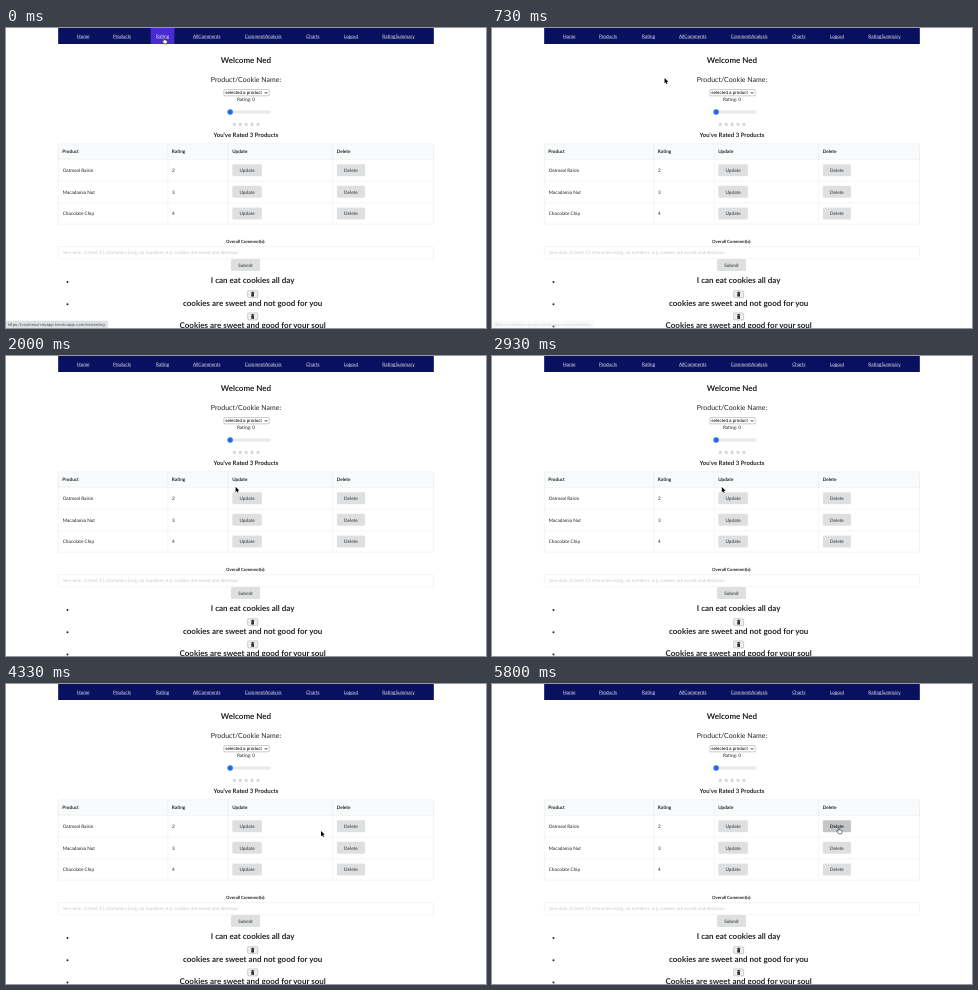
Recreate the animation shown at these times as an HTML page with a canvas. Size 480 px wide and 300 px high, loop 8000 ms.

```html
<!DOCTYPE html>
<html lang="en">
<head>
<meta charset="utf-8">
<title>Cookie ratings</title>
<style>
  html, body { margin: 0; width: 100%; height: 100%; overflow: hidden; background: #fff; }
  canvas { display: block; width: 480px; height: 300px; }
</style>
</head>
<body>
<canvas id="stage"></canvas>
<script>
const LOOP = 8000, TICK = 1000 / 15;
const LATO = 'Lato, sans-serif';
const INK = 'rgba(0,0,0,.87)', LINE = 'rgba(34,36,38,.12)';
const LEFT = 156.5, WIDTH = 1127;

const canvas = document.getElementById('stage');
const ctx = canvas.getContext('2d');
const dpr = window.devicePixelRatio || 1;
canvas.width = 480 * dpr;
canvas.height = 300 * dpr;

// The page is laid out at 1440 x 900 and shown at one third.
const K = 3;

const nav = [
  ['Home', 213], ['Products', 321], ['Rating', 450], ['AllComments', 561],
  ['CommentAnalysis', 716.5], ['Charts', 900.5], ['Logout', 1014], ['RatingSummary', 1129]
];
const columns = [['Product', LEFT], ['Rating', 485], ['Update', 666], ['Delete', 979.5]];
const ratings = [['Oatmeal Raisin', 2], ['Macadamia Nut', 3], ['Chocolate Chip', 4]];
const comments = [
  'I can eat cookies all day',
  'cookies are sweet and not good for you',
  'Cookies are sweet and good for your soul'
];

// Pointer moves: start ms, end ms, then the stage point reached.
const START = [158, 10];
const moves = [
  [0, 733, 172.5, 50], [733, 867, 192, 77], [867, 933, 192.7, 80],
  [1133, 1400, 227, 124.2], [1667, 2000, 229.6, 130.8], [2867, 2933, 229.8, 131],
  [2933, 3200, 246, 142], [3333, 3600, 279, 142.3], [3800, 4000, 311, 147],
  [4133, 4333, 315, 147], [4333, 4467, 324, 147], [4733, 5000, 344, 147],
  [5200, 5467, 347, 145], [5667, 5800, 346.8, 144]
];

const clamp = v => Math.max(0, Math.min(1, v));

function pointerAt(t) {
  let [x, y] = START;
  for (const [from, to, tx, ty] of moves) {
    const p = clamp((t - from) / (to - from));
    x += (tx - x) * p;
    y += (ty - y) * p;
  }
  return { x: x * K, y: y * K };
}

const inside = (p, x, y, w, h) => p.x >= x && p.x <= x + w && p.y >= y && p.y <= y + h;

function text(str, x, y, size, { bold, align = 'left', color = INK, font = LATO } = {}) {
  ctx.font = `${bold ? 700 : 400} ${size}px ${font}`;
  ctx.textAlign = align;
  ctx.fillStyle = color;
  ctx.fillText(str, x, y);
}

function box(x, y, w, h, fill, r = 0, stroke) {
  ctx.beginPath();
  ctx.roundRect(x, y, w, h, r);
  if (fill) { ctx.fillStyle = fill; ctx.fill(); }
  if (stroke) { ctx.strokeStyle = stroke; ctx.lineWidth = 1; ctx.stroke(); }
}

function line(x1, y1, x2, y2, color, width = 1) {
  ctx.strokeStyle = color;
  ctx.lineWidth = width;
  ctx.beginPath();
  ctx.moveTo(x1, y1);
  ctx.lineTo(x2, y2);
  ctx.stroke();
}

function disc(x, y, r, color) {
  ctx.fillStyle = color;
  ctx.beginPath();
  ctx.arc(x, y, r, 0, Math.PI * 2);
  ctx.fill();
}

// Returns true while the pointer is over the button.
function button(label, x, y, w, pointer) {
  const hot = inside(pointer, x, y, w, 36);
  box(x, y, w, 36, hot ? '#c4c5c7' : '#dedfe0', 4);
  text(label, x + w / 2, y + 23.4, 14, {
    bold: true, align: 'center', color: hot ? 'rgba(0,0,0,.8)' : 'rgba(0,0,0,.6)'
  });
  return hot;
}

function drawNav(pointer) {
  let hot = false;
  box(LEFT, 0, WIDTH, 48, '#0a1060');
  for (const [label, x] of nav) {
    ctx.font = `400 14px ${LATO}`;
    const w = ctx.measureText(label).width;
    if (inside(pointer, x - 16, 0, w + 32, 48)) {
      hot = true;
      box(x - 16, 0, w + 32, 48, '#4a2bd0');
    }
    text(label, x, 29.4, 14, { color: '#e4e4f0' });
    line(x, 31.5, x + w, 31.5, '#c4c4dc');
  }
  return hot;
}

function drawStar(cx, cy, r) {
  ctx.fillStyle = '#d2d2d2';
  ctx.beginPath();
  for (let i = 0; i < 10; i++) {
    const a = -Math.PI / 2 + i * Math.PI / 5, d = i % 2 ? r * 0.46 : r;
    ctx.lineTo(cx + d * Math.cos(a), cy + d * Math.sin(a));
  }
  ctx.fill();
}

function drawForm() {
  const mid = { align: 'center' }, strong = { align: 'center', bold: true };
  text('Welcome Ned', 720, 104.5, 24, strong);
  text('Product/Cookie Name:', 720, 162, 21, mid);

  box(653.5, 184.5, 136, 19, '#fff', 2, '#666');
  text('selected a product', 658, 198.6, 13.333, {
    color: '#000', font: '"Liberation Sans", Arial, sans-serif'
  });
  ctx.strokeStyle = '#000';
  ctx.lineWidth = 2;
  ctx.beginPath();
  ctx.moveTo(776, 192);
  ctx.lineTo(780, 196.5);
  ctx.lineTo(784, 192);
  ctx.stroke();

  text('Rating: 0', 720, 218.5, 14, mid);
  box(665, 248, 128, 8, '#ececec', 4, '#cfcfcf');
  disc(672.5, 252, 8, '#2469e6');
  for (let i = 0; i < 5; i++) drawStar(685 + i * 17.7, 289.5, 7.2);
  text("You've Rated 3 Products", 720, 326, 18, strong);
}

function drawTable(pointer) {
  const top = 347, body = 394, row = 65, height = 47 + row * 3;
  let hot = false;
  box(LEFT, top, WIDTH, 47, '#f9fafb', [4, 4, 0, 0]);
  box(LEFT + .5, top + .5, WIDTH - 1, height - 1, null, 4, 'rgba(34,36,38,.15)');
  columns.forEach(([label, x], i) => {
    if (i) line(x + .5, top, x + .5, top + height, LINE);
    text(label, x + 12.5, 376, 14, { bold: true });
  });
  ratings.forEach(([name, score], i) => {
    const y = body + row * i, base = y + 38;
    line(LEFT, y + .5, LEFT + WIDTH, y + .5, LINE);
    text(name, LEFT + 13.5, base, 14);
    text(score, 498, base, 14);
    hot = button('Update', 679, y + 14.5, 88.5, pointer) || hot;
    hot = button('Delete', 992.5, y + 14.5, 84.5, pointer) || hot;
  });
  return hot;
}

function drawTrash(x, y) {
  box(x - 15, y, 30, 21, '#efefef', 3, '#777');
  box(x - 5, y + 5, 10, 2, '#111');
  box(x - 2, y + 3.5, 4, 2, '#111');
  box(x - 4, y + 8, 8, 9.5, '#111', [0, 0, 1.5, 1.5]);
  for (const dx of [-1.6, 1.6]) line(x + dx, y + 9.5, x + dx, y + 16, '#999', .8);
}

function drawComments(pointer) {
  text('Overall Comment(s):', 719, 644, 13, { bold: true, align: 'center' });
  box(LEFT + .5, 655.5, WIDTH - 1, 37, '#fff', 4, 'rgba(34,36,38,.15)');
  text('text only, at least 15 characters long, no numbers. e.g. cookies are sweet and delicious',
    171.5, 679.4, 14, { color: '#c7c7c7' });
  button('Submit', 675, 693, 87, pointer);
  comments.forEach((comment, i) => {
    const y = 766 + i * 66.7;
    disc(184.5, y - 4, 3, INK);
    text(comment, 740, y, 24, { bold: true, align: 'center' });
    drawTrash(740, y + 22);
  });
}

function drawStatus(alpha) {
  if (!alpha) return;
  ctx.globalAlpha = alpha;
  box(-1, 879, 306, 22, '#dfe1e5', [0, 4, 0, 0], '#c8cacd');
  text('https://cookiesurveyapp.herokuapp.com/newrating', 5, 893.5, 12, {
    color: '#4a4d51', font: 'Inter, sans-serif'
  });
  ctx.globalAlpha = 1;
}

const ARROW = new Path2D('M0 0V16L3.7 12.6 6.1 18.2 8.6 17.1 6.2 11.6 11.3 11.3Z');
const HAND = new Path2D('M-1.8 1.5Q0-1.5 1.8 1.5V6Q4 5 5 6.5 7 6 7.8 7.5 10 7.5 10 9.5' +
  'L9.5 13 8 17.5H-.5L-5.5 10.5Q-6 8-3.8 8.5L-1.8 10Z');
const BEAM = new Path2D('M-3-8.5Q0-8.5 0-6.5 0-8.5 3-8.5M0-6.5V6.5M-3 8.5Q0 8.5 0 6.5 0 8.5 3 8.5');

function outline(path, color, width) {
  ctx.strokeStyle = color;
  ctx.lineWidth = width;
  ctx.stroke(path);
}

function drawPointer(pointer, onLink) {
  const onHeader = inside(pointer, 677, 361, 50, 21);
  ctx.save();
  ctx.translate(pointer.x, pointer.y);
  ctx.lineJoin = 'round';
  if (onLink) {
    ctx.fillStyle = '#fff';
    ctx.fill(HAND);
    outline(HAND, '#000', 1.5);
  } else if (onHeader) {
    outline(BEAM, '#fff', 3);
    outline(BEAM, '#000', 1.6);
  } else {
    outline(ARROW, '#fff', 2.4);
    ctx.fillStyle = '#000';
    ctx.fill(ARROW);
  }
  ctx.restore();
}

function draw(now) {
  const t = Math.floor((now % LOOP + 4) / TICK) * TICK;
  const pointer = pointerAt(t);
  ctx.setTransform(dpr / K, 0, 0, dpr / K, 0, 0);
  ctx.textRendering = 'geometricPrecision';
  ctx.fillStyle = '#fff';
  ctx.fillRect(0, 0, 1440, 900);
  const onNav = drawNav(pointer);
  drawForm();
  const onButton = drawTable(pointer);
  drawComments(pointer);
  drawStatus(clamp((800 - t) / 320));
  drawPointer(pointer, onNav || onButton);
}

let origin;
function frame(now) {
  origin ??= now;
  draw(now - origin);
  requestAnimationFrame(frame);
}
draw(0);
requestAnimationFrame(frame);
</script>
</body>
</html>
```
